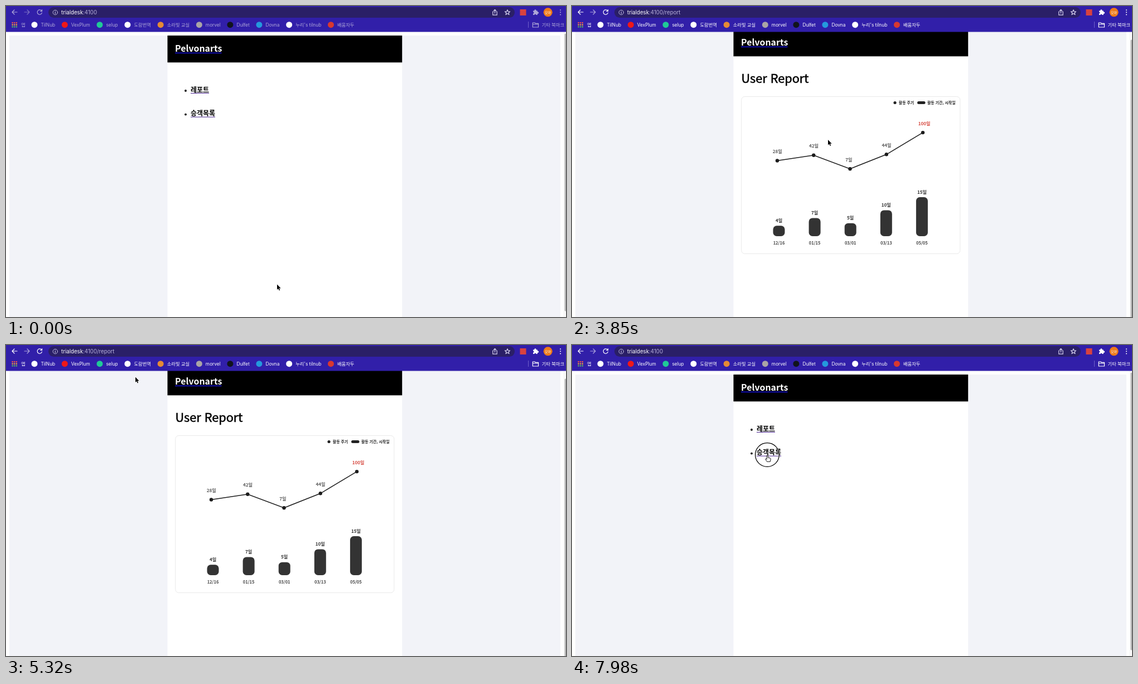
Recreate the animation shown at these times as an HTML page. Size 1004 by 558 pixels, loop 8 s.

```html
<!DOCTYPE html>
<html lang="ko">
<head>
<meta charset="utf-8">
<style>
html, body { margin: 0; width: 100%; height: 100%; overflow: hidden; background: #fff }
svg { display: block }
text { font-family: "Noto Sans CJK KR", "Noto Sans CJK", sans-serif; font-weight: 700 }
#bar text { font: 400 8.3px Inter, "Noto Sans CJK KR", "Noto Sans CJK", sans-serif; fill: currentColor }
#bar #url { font-size: 9.7px; fill: #b9b2dc }
#bar #avatar { font-size: 6px; fill: #fff }
#title { font-size: 21.7px; font-weight: 400; stroke: #000; stroke-width: .55 }
.icon { fill: none; stroke: currentColor; stroke-width: 1.2; stroke-linecap: round; stroke-linejoin: round }
.legend { font-size: 6.9px; fill: #222 }
.value { font-size: 8.1px }
.mid { text-anchor: middle }
.date { font-size: 7.5px }
</style>
</head>
<body>
<svg width="1004" height="558" viewBox="0 0 1004 558">
  <rect width="1004" height="558" fill="#fff"/>
  <g id="page">
    <rect x="6" y="53" width="988" height="560" fill="#f2f3f8"/>
    <rect x="289.5" y="53" width="420.7" height="560" fill="#fff"/>
    <rect x="289.5" y="53" width="420.7" height="48.3"/>
    <rect x="303" y="83.5" width="83.5" height="1.6" fill="#1410d8"/>
    <text x="303" y="82" font-size="15.9" fill="#fff">Pelvonarts</text>
    <g id="home">
      <circle cx="322" cy="152" r="1.9"/>
      <text x="331" y="154.7" font-size="12">레포트</text>
      <rect x="331" y="156" width="33" height="1" fill="#4a2590"/>
      <circle cx="322" cy="194.6" r="1.9"/>
      <text x="331" y="197.4" font-size="12">승객목록</text>
      <rect x="331" y="198.7" width="44" height="1" fill="#4a2590"/>
    </g>
    <g id="report">
      <text id="title" x="303.5" y="149.3">User Report</text>
      <g id="chart">
        <rect x="303.8" y="173.5" width="392" height="282" rx="6" fill="#fff" stroke="#e9e9e9"/>
        <circle cx="579" cy="184.5" r="2.6" fill="#222"/>
        <text class="legend" x="585.8" y="187">활동 주기</text>
        <rect x="619" y="182" width="14.5" height="5" rx="2.5" fill="#222"/>
        <text class="legend" x="637" y="187">활동 기간, 시작일</text>
      </g>
    </g>
  </g>
  <rect x="999" y="47" width="5" height="511" fill="#f9f9f9"/>
  <rect id="thumb" x="1001.5" width="4" height="498" rx="1.5" fill="#b4b4b4"/>

  <g id="bar">
    <rect width="1004" height="46.5" fill="#311fa9"/>
    <rect x="76" y="2" width="836" height="19" rx="9.5" fill="#2a1f67"/>
    <path class="icon" d="M20 11H11M15 7L11 11L15 15"/>
    <path class="icon" opacity=".6" d="M33 11H42M38 7L42 11L38 15"/>
    <path class="icon" d="M64 9A4.2 4.2 0 1 0 64.4 12.2M64.5 6.5V9.5H61.5"/>
    <g class="icon" color="#cfc9ea"><circle cx="88.3" cy="11.5" r="4.2" stroke-width=".9"/><path d="M88.3 11.3V13.5M88.3 9.3V9.4"/></g>
    <text id="url" x="99" y="14.8"><tspan fill="#fff">trialdesk</tspan>:4100<tspan id="path">/report</tspan></text>
    <g class="icon" color="#d5d0ee">
      <path d="M874 10H872.8V16.2H880.2V10H879M876.5 13V6.5M874.5 8.5L876.5 6.5L878.5 8.5"/>
      <path d="M899 6.8L900.3 10H903.6L901 12.2L902 15.6L899 13.6L896 15.6L897 12.2L894.4 10H897.7Z"/>
    </g>
    <rect x="921.5" y="6" width="11" height="11" fill="#d9423f"/>
    <path fill="currentColor" d="M945 8.5H947.3A1.7 1.7 0 1 1 950.5 8.5H952.8V10.6A1.7 1.7 0 1 1 952.8 13.8V16H950.4A1.5 1.5 0 0 0 947.4 16H945V13.6A1.5 1.5 0 0 0 945 10.6Z"/>
    <circle cx="971.6" cy="11.3" r="8" fill="#ee7a1a"/>
    <text id="avatar" class="mid" x="971.6" y="13.6">모아</text>
    <path class="icon" style="stroke-width:2" d="M994 7.2V7.2M994 11.3V11.3M994 15.4V15.4"/>
    <text x="27" y="37">앱</text>
    <path stroke="#6f60c8" d="M936.5 28V39"/>
    <path class="icon" d="M944.3 38V30H948L949.2 31.3H954.5V38ZM944.3 33H954.5"/>
    <text x="960.5" y="37">기타 북마크</text>
  </g>
  <g id="ring" fill="none"><circle stroke="#fff" stroke-opacity=".7" stroke-width="2.8"/><circle stroke="#000" stroke-width="1.3"/></g>
  <g id="cursor">
    <path id="arrow" stroke="#fff" stroke-width="1.6" paint-order="stroke" d="M0 0V9.6L2.2 7.6L3.7 11L5.2 10.3L3.7 7H6.7Z"/>
    <path id="hand" fill="#fff" stroke="#111" stroke-linejoin="round" d="M-1.3 1.2Q-.2 -.2 .8 1.2V5L4.6 5.8Q6 6.3 5.7 8.3L4.8 12.3H-.9L-3.6 8.4Q-3.8 6.7 -2.4 7.1L-1.3 8.2Z"/>
  </g>
</svg>
<script>
const $ = id => document.getElementById(id);
function add(parent, tag, attrs, text) {
  const el = document.createElementNS('http://www.w3.org/2000/svg', tag);
  for (const k in attrs) el.setAttribute(k, attrs[k]);
  if (text) el.textContent = text;
  return $(parent).appendChild(el);
}

['#ef5350', '#f4a13c', '#5fb85f'].forEach((fill, row) => {
  for (let i = 0; i < 3; i++) add('bar', 'rect', { x: 10.5 + i * 3.6, y: 29 + row * 3.6, width: 2.3, height: 2.3, fill });
});

// Bookmarks flow from left to right, each as wide as its label
const bookmarks = { TilNub: '#fff', VexPlum: '#f01818', selup: '#20c997', 도람번역: '#fff', '소라빛 교실': '#e58a35',
  morvel: '#aaa5a5', Dulfet: '#11141c', Dovna: '#2499dd', "누리's tilnub": '#fff', 배움자두: '#d8382f' };
let left = 45.5;
for (const [label, fill] of Object.entries(bookmarks)) {
  add('bar', 'circle', { cx: left + 5.5, cy: 33.7, r: 5.5, fill });
  left += 28.7 + add('bar', 'text', { x: left + 17, y: 37 }, label).getComputedTextLength();
}

// Chart: the line shows the cycle, the bars show the active days
const cycles = [28, 42, 7, 44, 100], days = [4, 7, 5, 10, 15];
const dates = ['12/16', '01/15', '03/01', '03/13', '05/05'];
const lineX = i => 368 + i * 65.25, lineY = i => 308.1 - cycles[i] * .7;
add('chart', 'polyline', { points: cycles.map((_, i) => [lineX(i), lineY(i)]).join(' '), fill: 'none', stroke: '#1c1c1c', 'stroke-width': 1.5 });
cycles.forEach((cycle, i) => {
  const x = 371 + i * 64.1, height = days[i] * 4.66, y = 424 - height;
  add('chart', 'circle', { cx: lineX(i), cy: lineY(i), r: 3.2, fill: '#1c1c1c' });
  add('chart', 'text', { x: lineX(i) - 8.3, y: lineY(i) - 13.4, fill: cycle < 100 ? '#5c5c5c' : '#d6493f', class: 'value' }, cycle + '일');
  add('chart', 'rect', { x: x - 10.5, y, width: 21, height, rx: 6.5, fill: '#333' });
  add('chart', 'text', { x, y: y - 6.6, fill: '#333', class: 'value mid' }, days[i] + '일');
  add('chart', 'text', { x, y: 438.5, fill: '#444', class: 'date mid' }, dates[i]);
});

// Pointer stops: arrival time, x, y
const stops = [[0, 486, 499.5], [70, 432, 321], [210, 421, 291], [700, 371, 168], [1120, 355, 145], [1610, 354.5, 153],
  [2240, 350, 152], [3010, 440, 356], [3430, 459, 240], [4340, 443, 443], [4900, 408, 277], [4970, 284, 160],
  [5320, 232, 57.5], [6160, 338.5, 76], [6650, 340, 66], [7840, 350.5, 197]];
const clicks = [2380, 6160, 6720, 7980];
const moveTime = 420;

function pointerAt(t) {
  const next = stops.findIndex(s => s[0] > t);
  if (next < 0) return stops.at(-1).slice(1);
  const [from, x0, y0] = stops[next - 1], [to, x1, y1] = stops[next];
  const f = Math.max(0, 1 - (to - t) / Math.min(moveTime, to - from));
  const ease = f * f * (3 - 2 * f);
  return [x0 + (x1 - x0) * ease, y0 + (y1 - y0) * ease];
}

// Scrolled to the end, with one elastic overshoot
function scrollAt(t) {
  if (t < 3850 || t >= 7140) return 0;
  const bounce = Math.min(1, Math.max(0, (t - 4130) / 420));
  return 11 + 6.3 * Math.sin(Math.PI * bounce);
}

const show = (id, on) => $(id).style.display = on ? '' : 'none';

function draw(t) {
  const [x, y] = pointerAt(t), scroll = scrollAt(t);
  const onReport = t >= 2660 && t < 7140;
  show('home', !onReport);
  show('report', onReport);
  show('path', onReport);
  show('chart', t >= 3220);
  $('page').setAttribute('transform', `translate(0 ${-scroll})`);
  $('thumb').setAttribute('y', 49.5 + Math.min(scroll, 11));
  $('bar').style.color = t < 1890 ? '#aea7d8' : '#fff';

  const inside = (x0, y0, x1, y1) => x > x0 && x < x1 && y > y0 && y < y1;
  const overLink = onReport ? inside(303, 54, 386, 74) : inside(331, 142, 364, 158) || inside(331, 185, 375, 201);
  show('hand', overLink);
  show('arrow', !overLink);
  $('cursor').setAttribute('transform', `translate(${x} ${y})`);

  const age = t - clicks.findLast(c => c <= t);
  show('ring', age <= 70);
  $('ring').setAttribute('transform', `translate(${x - .5} ${y})`);
  $('ring').setAttribute('opacity', age ? .75 : 1);
  for (const c of $('ring').children) c.setAttribute('r', age ? 15 : 21.4);
}

const start = performance.now();
(function tick() {
  draw(Math.floor((performance.now() - start) % 8000 / 70) * 70);
  requestAnimationFrame(tick);
})();
</script>
</body>
</html>
```
